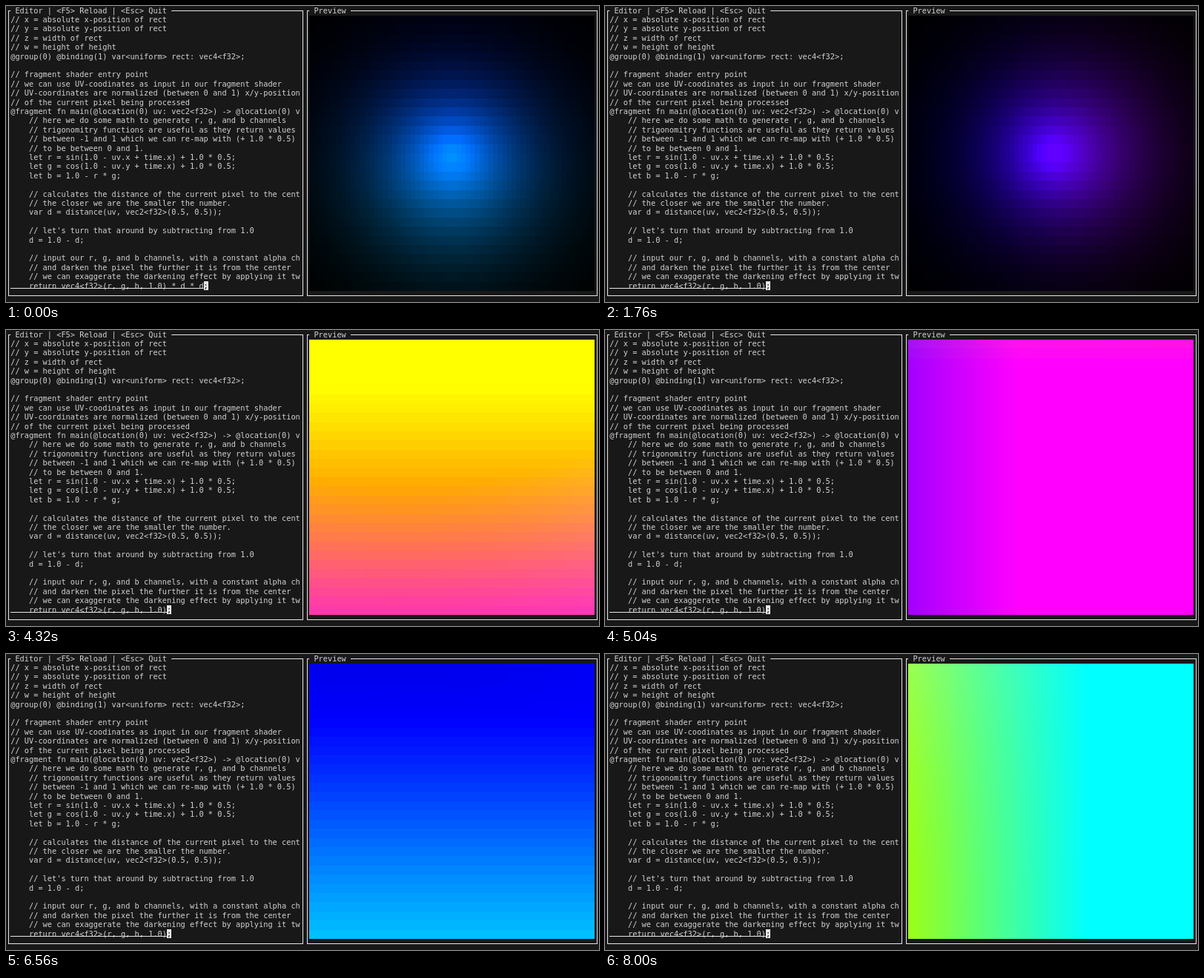
Write an HTML page with a canvas that moves like this. It is 800 px wide and 400 px high and loops after 8040 ms.

```html
<!DOCTYPE html>
<html lang="en">
<head>
<meta charset="utf-8">
<title>Shader editor</title>
<style>
  html, body { margin: 0; width: 100%; height: 100%; overflow: hidden; background: #181818; }
  canvas { display: block; }
</style>
</head>
<body>
<canvas id="stage" width="800" height="400"></canvas>
<script>
const ctx = document.getElementById('stage').getContext('2d');
const LOOP = 8040, STEP = 80, RELOAD = 3680;
const CW = 6.2, CH = 12.4;            // terminal cell
const COLS = 62, ROWS = 30, LEFT = 66, TOP = 1; // preview, in cells
const BG = '#181818', INK = '#d2d2d2', LINE = '#e6e6e6';

const source = `// x = absolute x-position of rect
// y = absolute y-position of rect
// z = width of rect
// w = height of height
@group(0) @binding(1) var<uniform> rect: vec4<f32>;

// fragment shader entry point
// we can use UV-coodinates as input in our fragment shader
// UV-coordinates are normalized (between 0 and 1) x/y-position
// of the current pixel being processed
@fragment fn main(@location(0) uv: vec2<f32>) -> @location(0) v
    // here we do some math to generate r, g, and b channels
    // trigonomitry functions are useful as they return values
    // between -1 and 1 which we can re-map with (+ 1.0 * 0.5)
    // to be between 0 and 1.
    let r = sin(1.0 - uv.x + time.x) + 1.0 * 0.5;
    let g = cos(1.0 - uv.y + time.x) + 1.0 * 0.5;
    let b = 1.0 - r * g;

    // calculates the distance of the current pixel to the cent
    // the closer we are the smaller the number.
    var d = distance(uv, vec2<f32>(0.5, 0.5));

    // let's turn that around by subtracting from 1.0
    d = 1.0 - d;

    // input our r, g, and b channels, with a constant alpha ch
    // and darken the pixel the further it is from the center
    // we can exaggerate the darkening effect by applying it tw`.split('\n');
const lastLine = '    return vec4<f32>(r, g, b, 1.0) * d * d';

// Phase at the preview centre over time; it stalls while the shader reloads
const phaseKeys = [
  [0, 4.8], [1760, 9.52], [3120, 11.73], [3360, 12.12], [3600, 12.12], [3680, 13],
  [4160, 13.7], [4240, 13.7], [4320, 13.94], [5040, 15.07], [6560, 17.05], [8000, 18.46]
];

const clamp = (x, lo, hi) => Math.min(hi, Math.max(lo, x));

function phaseAt(t) {
  const next = phaseKeys.findIndex(key => key[0] >= t);
  const k = next < 0 ? phaseKeys.length - 1 : Math.max(next, 1);
  const [t0, p0] = phaseKeys[k - 1], [t1, p1] = phaseKeys[k];
  return p0 + (p1 - p0) * (t - t0) / (t1 - t0);
}

const cellX = col => Math.round(col * CW);
const cellY = row => Math.round(row * CH + .6);

function text(str, col, row, color = INK) {
  ctx.fillStyle = color;
  [...str].forEach((c, i) => {
    if (c !== ' ') ctx.fillText(c, (col + i) * CW, Math.round(row * CH + 9.5));
  });
}

function box(x0, x1, title, col) {
  ctx.strokeStyle = LINE;
  ctx.lineWidth = 1;
  ctx.strokeRect(x0 + .5, 6.5, x1 - x0, 385);
  ctx.fillStyle = BG;
  ctx.fillRect(col * CW, 0, title.length * CW, 12);
  text(title, col, 0);
}

function preview(t) {
  const phase = phaseAt(t);
  for (let row = 0; row < ROWS; row++) {
    const v = (row + .5) / ROWS;
    const y0 = cellY(TOP + row), y1 = cellY(TOP + row + 1);
    for (let col = 0; col < COLS; col++) {
      const u = (col + .5) / COLS;
      const r = Math.sin(phase + .5 - u) + .5;
      const g = Math.cos(phase - .5 + v) + .5;
      // d * d scales both colour and alpha
      const glow = t < RELOAD ? (1 - Math.hypot(u - .5, v - .5)) ** 4 : 1;
      const rgb = [r, g, 1 - r * g].map(c => Math.round(255 * clamp(c * glow, 0, 1)));
      const x0 = cellX(LEFT + col), x1 = cellX(LEFT + col + 1);
      ctx.fillStyle = `rgb(${rgb})`;
      ctx.fillRect(x0, y0, x1 - x0, y1 - y0);
    }
  }
}

function editor(t) {
  source.forEach((line, i) => text(line.slice(0, 63), 1, i + 1));
  const erased = clamp(Math.round((t - 880) / 100), 0, 8);
  const line = lastLine.slice(0, lastLine.length - erased);
  const end = 1 + line.length;
  text(line, 1, 30);
  ctx.fillStyle = LINE;
  ctx.fillRect(6, 381, end * CW - 6, 1);
  ctx.fillRect(cellX(end), 372, 6, 12);
  text(';', end, 30, BG);
}

function draw(now) {
  const t = Math.floor(now % LOOP / STEP) * STEP;
  ctx.fillStyle = BG;
  ctx.fillRect(0, 0, 800, 400);
  ctx.font = '10.3px "DejaVu Sans Mono", "Noto Sans Mono", monospace';
  box(3, 400, ' Editor | <F5> Reload | <Esc> Quit ', 1);
  box(406, 797, ' Preview ', LEFT);
  editor(t);
  preview(t);
}

const start = performance.now();
function tick() {
  draw(performance.now() - start);
  requestAnimationFrame(tick);
}
tick();
</script>
</body>
</html>
```
